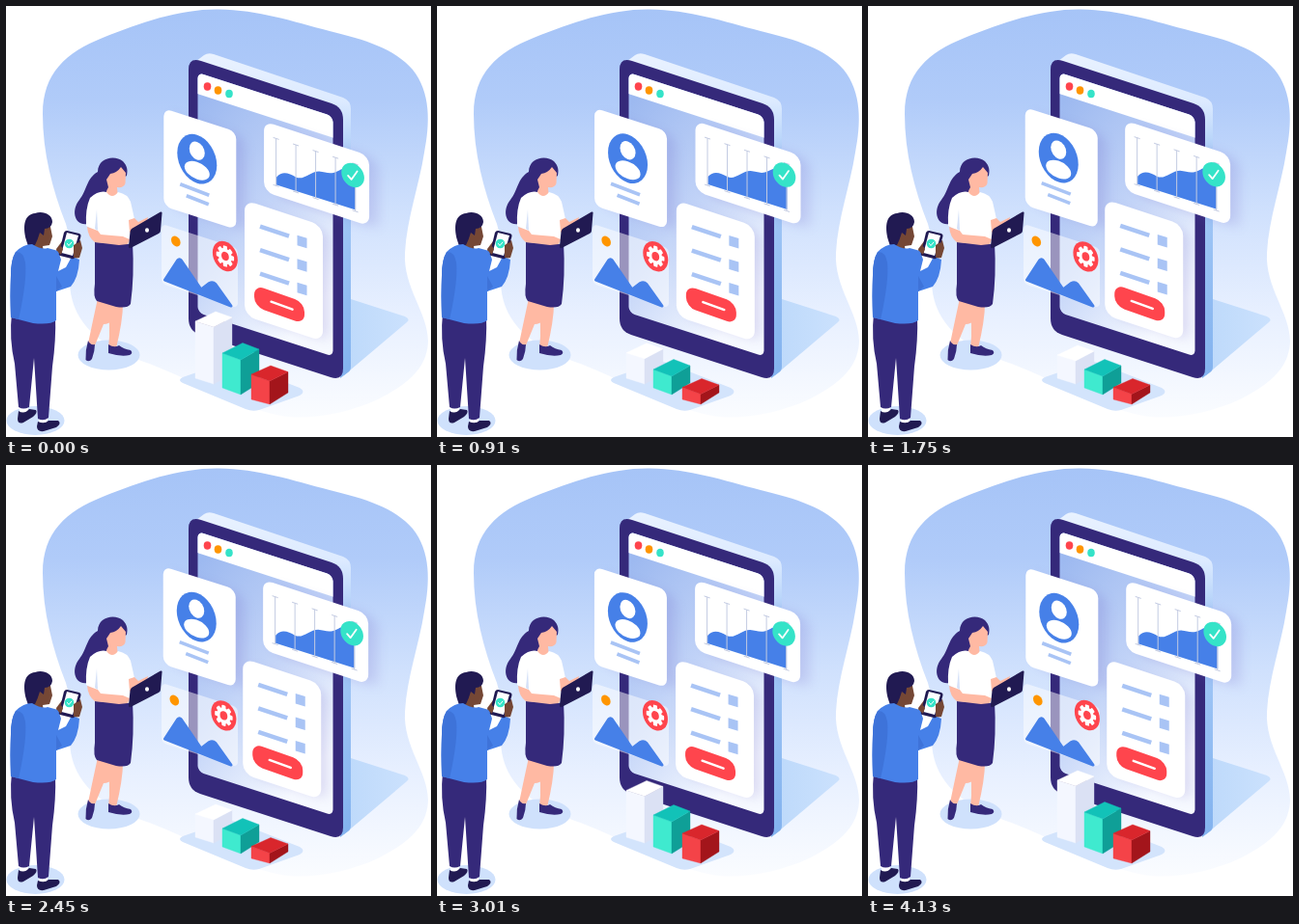
Recreate the animation shown at these times as an HTML page. Size 440 px wide and 447 px high, loop 4.2 s.

```html
<!DOCTYPE html>
<html lang="en">
<head>
<meta charset="utf-8">
<title>App building scene</title>
<style>
html, body { margin: 0; width: 100%; height: 100%; overflow: hidden; background: #fff; }
svg { display: block; width: 440px; height: 447px; }
.navy { fill: #35297a; }
.ink { fill: #211a52; }
.blue { fill: #4680e8; }
.skin { fill: #ffb9a3; }
.brown { fill: #754735; }
.white { fill: #fff; }
.red { fill: #ff454d; }
.teal { fill: #35e3c8; }
.pale { stroke: #a9c4f5; stroke-width: 4.5; fill: none; }
.mark { fill: none; stroke: #fff; stroke-linecap: round; stroke-linejoin: round; }
.axis { stroke: #c3cbe2; stroke-width: 1; fill: none; }
.shade { fill: #6f62c4; opacity: .2; filter: url(#blur); }
</style>
</head>
<body>
<svg viewBox="0 0 440 447">
  <defs>
    <linearGradient id="sky" x1="0" y1="0" x2="0" y2="1">
      <stop offset="0" stop-color="#a6c4f7"/>
      <stop offset=".22" stop-color="#b0cbf9"/>
      <stop offset=".5" stop-color="#d0e1fd"/>
      <stop offset=".75" stop-color="#e8f0ff"/>
      <stop offset="1" stop-color="#fafcff"/>
    </linearGradient>
    <linearGradient id="glass" x1="0" y1="0" x2=".5" y2="1">
      <stop offset=".1" stop-color="#9db9f0"/>
      <stop offset=".55" stop-color="#c0d2f7"/>
      <stop offset="1" stop-color="#f6f9ff"/>
    </linearGradient>
    <linearGradient id="edge" x1="0" y1="0" x2="0" y2="1">
      <stop offset="0" stop-color="#e9f2ff"/>
      <stop offset=".15" stop-color="#dceaff"/>
      <stop offset=".32" stop-color="#a9ccf8"/>
      <stop offset="1" stop-color="#82b2ee"/>
    </linearGradient>
    <linearGradient id="floor" x1="0" y1="0" x2="1" y2="0">
      <stop offset="0" stop-color="#bbd8fa"/>
      <stop offset="1" stop-color="#cbe1fd"/>
    </linearGradient>
    <filter id="blur" x="-40%" y="-40%" width="180%" height="180%"><feGaussianBlur stdDeviation="6"/></filter>
    <clipPath id="screen"><rect width="140" height="249" rx="6" transform="matrix(1 .325 0 1 198.5 69)"/></clipPath>
  </defs>

  <path fill="url(#sky)" d="M38 112C38 70 62 48 100 33C140 17 180 3 220 3.500C262 4 296 16 335 26C372 35 402 44 421 66C440 90 439 122 433 152C428 185 415 220 413 256C411 292 437 318 437 348C436 378 412 394 385 408C355 422 315 430 285 425C230 414 190 385 140 368C90 350 66 322 66 285C66 262 68 246 62 226C48 190 38 152 38 112Z"/>

  <path fill="url(#floor)" d="M350 383L415 328Q419 325 413 322L357 304L340 330Z"/>

  <!-- tablet -->
  <path fill="url(#edge)" d="M193 60L205 51Q209 48 215 50L349 95Q357 98 357 107L357 374Q357 378 354 380L346 386L320 110Z"/>
  <path class="navy" d="M189 66Q189 53 202 57L337 101Q349 105 349 118L349 376Q349 389 336 385L201 341Q189 337 189 324Z"/>
  <g clip-path="url(#screen)">
    <rect x="198" y="65" width="142" height="305" fill="url(#glass)"/>
    <path class="white" d="M198 65L340 65L340 137L198 91Z"/>
  </g>
  <ellipse class="red" cx="208.500" cy="83.500" rx="3.800" ry="4.200"/>
  <ellipse cx="219.500" cy="87.500" rx="3.800" ry="4.200" fill="#ff9500"/>
  <ellipse class="teal" cx="231" cy="91" rx="3.800" ry="4.200"/>

  <!-- picture card -->
  <rect width="79" height="62" rx="5" fill="#fff" opacity=".5" transform="matrix(1 .32 0 1 161 226)"/>
  <path class="blue" stroke="#4680e8" stroke-width="3" stroke-linejoin="round" d="M164.500 284L177.500 264Q179.500 261.500 181.500 264L202 294L210.500 287.500Q214 285.500 217 288.500L233 311Z"/>
  <circle id="sun" r="4.800" fill="#ff9500"/>
  <g id="gear">
    <circle class="red" r="13"/>
    <g id="teeth" class="white"><circle r="7"/></g>
    <circle class="red" r="3.900"/>
  </g>

  <!-- profile card -->
  <g id="profile">
    <rect class="shade" width="75" height="96" rx="8" transform="matrix(1 .32 0 1 172 112)"/>
    <rect class="white" width="75" height="101.500" rx="8" transform="matrix(1 .32 0 1 163 106)"/>
    <g transform="matrix(1 .32 0 1 197.500 158.500)">
      <ellipse class="blue" rx="20.500" ry="25"/>
      <ellipse class="white" cy="-8.500" rx="8" ry="9.300"/>
      <ellipse class="white" cy="12" rx="13" ry="9"/>
    </g>
    <path class="pale" style="stroke-width:3.600" d="M180 184.500L210 196M186.500 196.500L209.500 205.500"/>
  </g>

  <!-- chart card -->
  <g id="chart">
    <rect class="shade" width="108" height="72" rx="10" transform="matrix(1 .32 0 1 277 124)"/>
    <rect class="white" width="109" height="73" rx="10" transform="matrix(1 .33 0 1 267 119)"/>
    <path class="blue" d="M280 177C286 170 293 173 300 177C308 181 315 171 324 171C332 172 336 175 345 170C352 166 357 169 362 174L362 211L280 185Z"/>
    <g id="axes" class="axis"></g>
    <circle class="teal" r="11.800" transform="matrix(1 .25 0 1.050 359 175)"/>
    <path class="mark" stroke-width="1.800" d="M354 175.500L357.500 179.500L363.500 171"/>
  </g>

  <!-- list card -->
  <g id="list">
    <rect class="shade" width="80" height="114" rx="12" transform="matrix(1 .32 0 1 254 208)"/>
    <rect class="white" width="81" height="120" rx="11" transform="matrix(1 .33 0 1 246.500 201)"/>
    <g id="rows"></g>
    <rect class="red" width="52" height="22.500" rx="10" transform="matrix(1 .35 0 1 256.500 289)"/>
    <path class="mark" stroke-width="2.400" d="M274 306.500L296 314.500"/>
  </g>

  <!-- bars -->
  <path fill="#d3e4fc" d="M183 385L226 370Q232 368 238 370L304 396Q311 400 304 404L262 419Q255 421 248 418L183 391Q177 388 183 385Z"/>
  <g id="bars"></g>

  <!-- woman -->
  <ellipse cx="106.500" cy="362" rx="32" ry="15.500" fill="#cfe1fc"/>
  <path class="skin" d="M95 303L116 308Q113 330 101 330L92 352L85 350Q90 326 95 303ZM104 306L121 309Q121 326 114 355L106 355Q109 330 104 306Z"/>
  <path class="navy" d="M85 347Q87 352 92 351Q92 358 89 366Q86 370 82.500 367Q82 357 85 347ZM106 351Q112 355 117 352Q122 356 129 357Q132 360 128 362Q119 364 106 360Z"/>
  <path class="navy" d="M92 243L131 245Q133 280 129 309Q126 314 114 312L94 306Q90 302 92 288Z"/>
  <path class="navy" d="M95 172C95 157 113 154 121 161C126 166 126 171 125 176L112 184L110 194C110 208 98 224 84 226C71 228 67 212 76 201C84 191 83 179 95 172Z"/>
  <path class="skin" d="M108 174Q115 173 119 167L124 173L123.500 184Q122 189 115 188L116 200L104 201Q102 194 106 188L104 180Z"/>
  <path class="white" d="M87 199Q96 191 104 193Q110 201 116 193Q126 195 129 203L133 221L130 247L92 245L93 233L83 228Q82 210 87 199Z"/>
  <path class="skin" d="M84 229L95 233L98 237L121 239L128 242L126 247L117 248L92 245Q85 240 84 229ZM127 222L133 220L137 224L147 219L146 223L128 235Z"/>
  <path fill="#d5e1f8" d="M94 211L95 233L92 231Z"/>
  <path class="ink" d="M130 231L160 213.500Q162 213 161.500 215L160 233Q160 235 158 236L129 251Q127 252 127 249L128.500 234Q129 232 130 231Z"/>
  <ellipse class="white" cx="146" cy="232.500" rx="2" ry="2.200"/>

  <!-- man -->
  <ellipse cx="30.500" cy="430" rx="30" ry="15" fill="#cfe1fc"/>
  <path class="white" d="M14 412L23 412L23 424L14 424ZM34 424L43 424L43 435L34 435Z"/>
  <path class="ink" d="M13 420Q19 424 24 418L31 419Q33 422 28 426L18 432Q12 434 12 428ZM33 431Q40 434 44 430L54 430Q58 433 52 437L39 441Q32 442 32 436Z"/>
  <path class="navy" d="M6 318L51 322Q52 345 48 374L44 427Q39 431 33 428L29 365L24 416Q18 419 13 416L9 371Q3 345 6 318Z"/>
  <path class="brown" d="M30 226L46 229L48 239L45 248L38 249L39 256L25 252Z"/>
  <path class="ink" d="M21 243C17 228 19 216 30 215C38 212 48 216 48 224Q47 231 40 231L39 238L35 235Q33 242 30 248L23 249Z"/>
  <path class="brown" d="M52 252L58 244L62 248L59 258L54 259ZM70 245L77 243L79 251L76 261L69 262Z"/>
  <path class="blue" d="M10 255Q18 247 27 247Q37 253 43 251L54 254L57 263L54 275L62 271L68 260L76 263Q75 282 67 291L52 296L52 326Q46 331 28 329L5 323Q4 300 5 279Q5 263 10 255Z"/>
  <path fill="#3e73d9" d="M10 255Q18 254 20 266Q22 285 13 325L5 323Q4 298 5 279Q5 263 10 255ZM52 280L58 291L52 296Z"/>
  <path class="ink" d="M63 233L76 236Q78 237 77.500 239L71 261Q70 263 68 262L56 259Q54 258 55 256L60 235Q61 233 63 233Z"/>
  <path class="white" d="M63 235L75 238L69 259L57.500 256Z"/>
  <circle class="teal" cx="65.500" cy="246.500" r="4.800"/>
  <path class="mark" stroke-width="1" d="M63.500 246.500L65 248.500L68 245"/>
  <path class="brown" d="M70 248L75 245L77 249L75 260L70 261ZM52 253L57 249L59 252L57 258Z"/>
</svg>
<script>
const LOOP = 4200;
const $ = id => document.getElementById(id);

function add(parent, tag, attrs) {
  const el = document.createElementNS('http://www.w3.org/2000/svg', tag);
  for (const k in attrs) el.setAttribute(k, attrs[k]);
  return parent.appendChild(el);
}

for (let i = 0; i < 8; i++)
  add($('teeth'), 'rect', { x: -2.1, y: -9.2, width: 4.2, height: 5, rx: 1, transform: `rotate(${i * 45})` });

for (let i = 0; i < 5; i++) {
  const x = 279.5 + i * 20.5, y = 137 + i * 6.6;
  add($('axes'), 'path', { d: `M${x} ${y}v49m-3 -1l6 2m-6 -51l6 2` });
}

for (let i = 0; i < 3; i++) {
  const y = 229.5 + i * 24.5;
  add($('rows'), 'path', { class: 'pale', d: `M262.5 ${y - 1}l30 10` });
  add($('rows'), 'rect', { width: 10, height: 10.5, fill: '#a9c4f5', transform: `matrix(1 .3 0 1 301 ${y + 8})` });
}

// Corners are left, back, right, front; feet are left, front, right.
const bars = [
  { top: [[196, 327], [217, 317], [234, 323], [215, 333]], feet: [386, 392, 382],
    fill: ['#f4f7ff', '#dbe1f4', '#ffffff'], drop: 35, down: [0, 1080], up: [2500, 3300] },
  { top: [[224, 360], [245, 349.5], [262, 356], [243, 367]], feet: [396, 403, 391],
    fill: ['#3feacf', '#0f9f97', '#12c2b8'], drop: 17, down: [0, 930], up: [2500, 3200] },
  { top: [[254, 382], [274, 373], [292, 379.5], [273, 389]], feet: [408, 413, 401],
    fill: ['#f44348', '#a3151b', '#d9262c'], drop: 13.5, down: [0, 780], up: [2450, 2990] }
];
for (const b of bars) b.faces = b.fill.map(fill => add($('bars'), 'polygon', { fill, stroke: fill, 'stroke-width': .4 }));

function ease(t, [from, to]) {
  const p = Math.min(1, Math.max(0, (t - from) / (to - from)));
  return p * p * (3 - 2 * p);
}

function drawBar(b, t) {
  const fall = b.drop * (ease(t, b.down) - ease(t, b.up));
  const [l, k, r, f] = b.top.map(([x, y]) => [x, y + fall]);
  const [lf, ff, rf] = b.feet;
  const faces = [
    [l, f, [f[0], ff], [l[0], lf]],
    [f, r, [r[0], rf], [f[0], ff]],
    [l, k, r, f]
  ];
  faces.forEach((p, i) => b.faces[i].setAttribute('points', p.join(' ')));
}

function move(id, x, y, skew = 0, tall = 1) {
  $(id).setAttribute('transform', `matrix(1 ${skew} 0 ${tall} ${x.toFixed(3)} ${y.toFixed(3)})`);
}

function draw(t) {
  const half = Math.min(t, LOOP - t);
  const sway = Math.cos(Math.PI * (half - 600) / 1500);
  const slow = Math.cos(2 * Math.PI * t / LOOP);
  move('list', 1.7 * sway, .7 * sway);
  move('chart', .9 * sway - .2, .4 * slow);
  move('profile', .3 * slow, .6 * slow - .4);
  move('sun', 175 + .8 * slow, 244, .3, 1.08);
  move('gear', 226.1 + .8 * slow, 259.7 - .2 * slow, .3, 1.17);
  bars.forEach(b => drawBar(b, t));
}

const start = performance.now();
function tick() {
  draw((performance.now() - start) % LOOP);
  requestAnimationFrame(tick);
}
tick();
</script>
</body>
</html>
```
